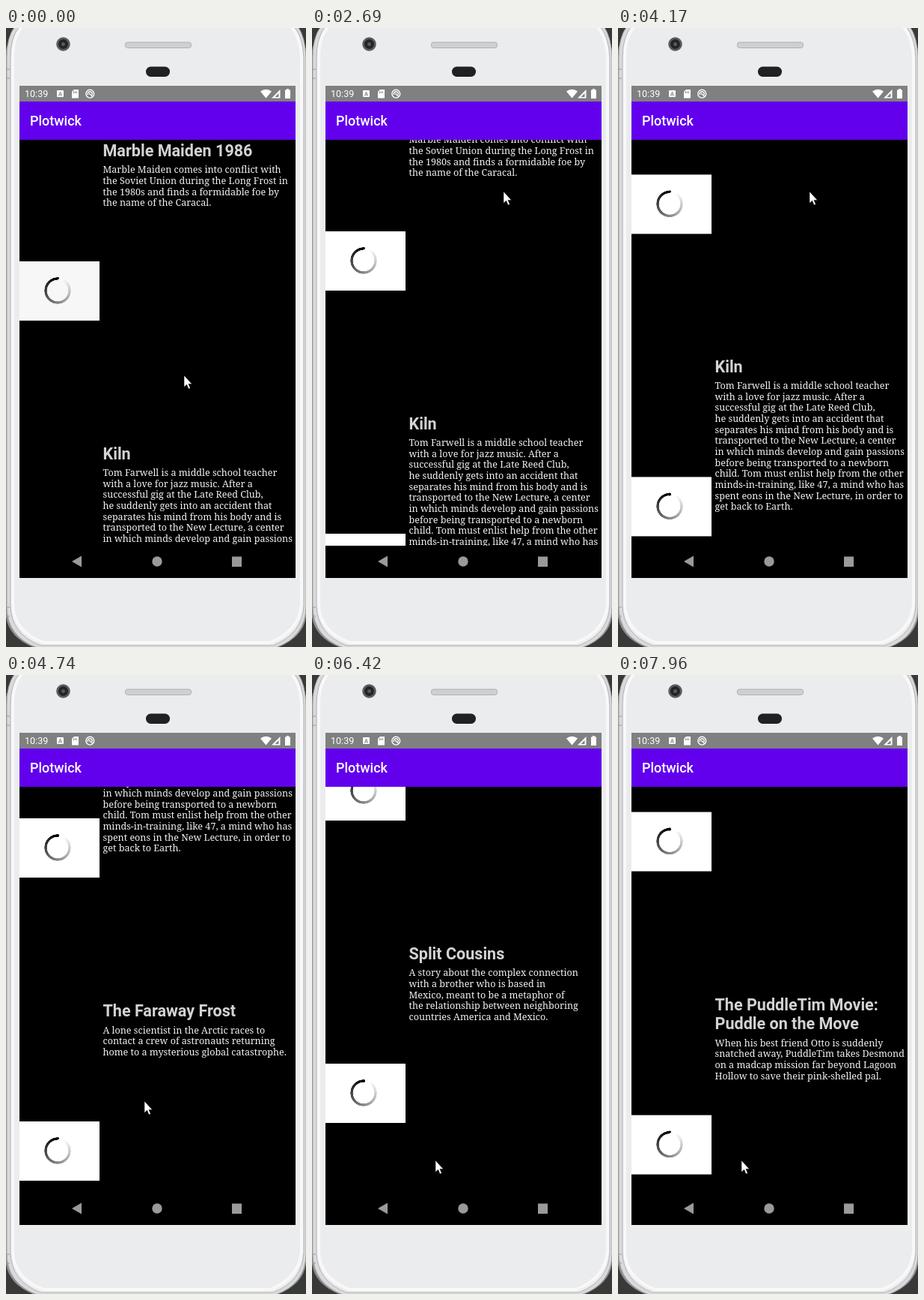
An HTML page that plays this animation: 401 by 825 pixels, repeating every 8 s.

```html
<!DOCTYPE html>
<html lang="en">
<head>
<meta charset="utf-8">
<title>Movie list</title>
<style>
html, body { margin: 0; width: 100%; height: 100%; overflow: hidden; background: #8d8d8f; }
svg { position: absolute; left: 0; top: 0; }
svg text { font-family: Roboto, sans-serif; fill: #fff; }
#list { position: absolute; left: 18px; top: 149px; width: 369px; height: 541px; overflow: hidden; background: #000; }
#items { position: absolute; left: 0; top: 0; }
.item { position: absolute; left: 0; width: 369px; }
.copy { position: absolute; left: 111.5px; top: 2px; white-space: pre; }
h2 { margin: 0; font: bold 21.55px/25.2px Roboto, sans-serif; color: #d3d3d3; }
p { margin: 6.2px 0 0; font: 12.57px/14.65px "Noto Serif", serif; color: #f2f2f2; }
.poster { position: absolute; left: 0; top: 161.5px; width: 107px; height: 79px; background: var(--poster); }
.ring {
  position: absolute; left: 33px; top: 21px; width: 36px; height: 36px; border-radius: 50%;
  background: conic-gradient(#0000 8%, #000 98%);
  mask: radial-gradient(circle, #0000 14px, #000 14.6px, #000 17.4px, #0000 18px);
}
.ring + i { position: absolute; left: 49.3px; top: 21.2px; width: 3.4px; height: 3.4px; border-radius: 50%; background: #000; }
</style>
</head>
<body>
<svg width="401" height="825">
  <!-- phone body -->
  <path d="M0 0H20Q4 8 0 30ZM401 0H382Q397 8 401 30ZM0 785Q4 812 36 825H0ZM401 785Q397 812 364 825H401Z" fill="#383a38"/>
  <path d="M12-2Q1 12 1 40V772Q2 812 42 826H360Q400 812 401 772V40Q400 12 390-2Z" fill="#dadadc" stroke="#aaa5a8"/>
  <path d="M18-2Q6 12 6 40V770Q7 808 46 823H357Q396 808 398 770V40Q397 12 385-2Z" fill="#ebeced" stroke="#b5b2b5"/>
  <path d="M22-2Q9 12 9 40V768Q10 804 50 819H353Q392 804 395 768V40Q394 12 381-2" fill="none" stroke="#f8f8f9" stroke-width="4"/>
  <path d="M0 55H5M0 67H5M0 772H5M0 784H5" stroke="#9a979a"/>
  <circle cx="76.500" cy="21.500" r="9.300" fill="#5a5c5f"/>
  <circle cx="76.500" cy="21.500" r="6.500" fill="#222427"/>
  <circle cx="76.500" cy="21.500" r="2.500" fill="#525a63"/>
  <rect x="159.500" y="19" width="88" height="7.500" rx="3" fill="#d0d0d1" stroke="#b0b0b1"/>
  <rect x="187" y="51.500" width="32" height="13.500" rx="6.500" fill="#202124"/>
  <!-- screen -->
  <path d="M18 77H387V733H18Z"/>
  <path d="M18 77H387V98H18Z" fill="#808080"/>
  <path d="M18 98H387V149H18Z" fill="#6200ee"/>
  <text x="25" y="92" font-size="12.570">10:39</text>
  <text x="32" y="130.300" font-size="17.950" font-weight="500">Plotwick</text>
  <g fill="#fff">
    <rect x="68" y="83" width="9" height="9" rx="1"/>
    <path d="M91 82H97V93.500H88V85Z"/>
    <path d="M340 84.500Q347.500 79 355 84.500L347.500 93.500Z"/>
    <path d="M366.500 82V93.500H355ZM364.500 87L359.500 92H364.500Z" fill-rule="evenodd"/>
    <path d="M373 82.500H375V81H378V82.500H380V94H373Z"/>
  </g>
  <path d="M70.500 90.500L72.500 85L74.500 90.500M71.200 89H73.800M90.500 84.500V87M92.500 84.500V87M94.500 84.500V87" fill="none" stroke="#808080"/>
  <g fill="none" stroke="#fff" stroke-width="1.400">
    <circle cx="112.300" cy="87.700" r="5.400"/>
    <path d="M109.500 89A3 3 0 1 1 115 89M111 87L116 91.500"/>
  </g>
  <g fill="#9a9a9a">
    <path d="M88 711L101 703.500V718.500Z"/>
    <circle cx="202" cy="711" r="6.700"/>
    <rect x="302" y="704.500" width="13" height="13.500"/>
  </g>
</svg>
<div id="list"><div id="items"></div></div>
<svg width="401" height="825">
  <path id="cursor" d="M0 0V15.500L3.600 12.300 6 18 8.400 17 6 11.400H10.600Z" fill="#fff" stroke="#000" stroke-width=".5"/>
</svg>
<script>
const LOOP = 8000, PITCH = 403.7;
const $ = id => document.getElementById(id);

const movies = [
  ["Marble Maiden 1986", `Marble Maiden comes into conflict with
the Soviet Union during the Long Frost in
the 1980s and finds a formidable foe by
the name of the Caracal.`],
  ["Kiln", `Tom Farwell is a middle school teacher
with a love for jazz music. After a
successful gig at the Late Reed Club,
he suddenly gets into an accident that
separates his mind from his body and is
transported to the New Lecture, a center
in which minds develop and gain passions
before being transported to a newborn
child. Tom must enlist help from the other
minds-in-training, like 47, a mind who has
spent eons in the New Lecture, in order to
get back to Earth.`],
  ["The Faraway Frost", `A lone scientist in the Arctic races to
contact a crew of astronauts returning
home to a mysterious global catastrophe.`],
  ["The Road to Harrow Mill", `A man foils an attempted murder, then
flees the crew of would-be killers along
with their intended target as a woman
he's just met tries to find him.`],
  ["Split Cousins", `A story about the complex connection
with a brother who is based in
Mexico, meant to be a metaphor of
the relationship between neighboring
countries America and Mexico.`],
  ["Stranger in the Hold", `A navy pilot traveling with top secret
documents on a K-42 Soaring Bastion
encounters an evil presence on board the
flight.`],
  ["The PuddleTim Movie:\nPuddle on the Move", `When his best friend Otto is suddenly
snatched away, PuddleTim takes Desmond
on a madcap mission far beyond Lagoon
Hollow to save their pink-shelled pal.`]
];

$("items").innerHTML = movies.map(([title, plot], i) => `
  <div class="item" style="top:${i * PITCH}px">
    <div class="poster"><div class="ring"></div><i></i></div>
    <div class="copy"><h2>${title}</h2><p>${plot}</p></div>
  </div>`).join("");

// [time, scroll offset]: the screen refreshes in hard steps
const scrolls = [
  [0, 0], [2690, 40], [2840, 95], [2990, 105.5], [3380, 106], [3880, 106.5], [4000, 107],
  [4170, 115.6], [4290, 145], [4500, 200], [4620, 390], [4740, 523],
  [4880, 570], [5050, 650], [5200, 830], [5320, 1010], [5440, 1180],
  [5680, 1252.7], [5800, 1262], [5930, 1268], [6180, 1295], [6300, 1345], [6420, 1407],
  [6560, 1442], [6680, 1492], [6890, 1581], [7030, 1632], [7160, 1664.8],
  [7300, 1690], [7450, 1725], [7570, 1795], [7690, 1900], [7810, 2025], [7960, 2146.4]
];
// [time, x, y]
const pointer = [
  [0, 238, 463], [610, 233, 321], [840, 243, 246], [990, 256, 218],
  [4500, 185, 568], [5050, 165, 647]
];
const at = (steps, t) => steps.findLast(s => s[0] <= t);

function draw(now) {
  const t = now % LOOP;
  const [, y] = at(scrolls, t);
  const [, cx, cy] = at(pointer, t);
  $("items").style.transform = `translateY(${-y}px)`;
  $("list").style.setProperty("--poster", y ? "#fff" : "#f7f7f7");
  $("cursor").setAttribute("transform", `translate(${cx} ${cy})`);
}

const start = performance.now();
function tick() {
  draw(performance.now() - start);
  requestAnimationFrame(tick);
}
tick();
</script>
</body>
</html>
```
